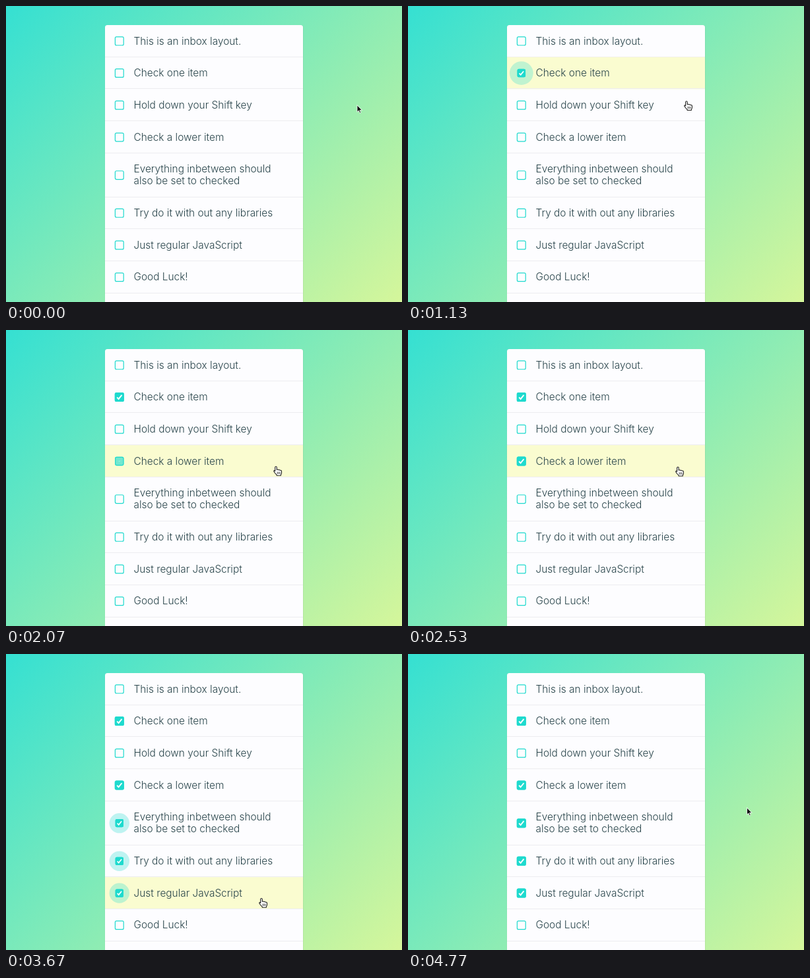
An HTML page for the animation above (4810 ms loop, 600 px wide and 450 px high).

```html
<!DOCTYPE html>
<html lang="en">
<head>
<meta charset="utf-8">
<title>Inbox checklist</title>
<style>
  html, body { margin: 0; width: 100%; height: 100%; overflow: hidden; }
  body { background: linear-gradient(135deg, #35e0d2, #d5f69b); }
  svg { display: block; }
  text { font: 300 15.4px Inter, "Open Sans", sans-serif; fill: #28444a; }
</style>
</head>
<body>
<svg width="600" height="450" viewBox="0 0 600 450">
  <rect x="149.5" y="29" width="301.5" height="440" rx="4" fill="#000" opacity=".05"/>
  <rect x="150" y="29" width="300" height="440" rx="3.5" fill="#fdfdff"/>
  <g id="list"></g>
  <g id="cursor" stroke-linejoin="round" stroke-linecap="round">
    <path id="arrow" d="M0 0V10.2L2.4 8 4 11.8 5.7 11 4.1 7.4H7.2Z" fill="#111" stroke="#fff" stroke-width=".8"/>
    <g id="hand" fill="#fff" stroke="#222" stroke-width="1.1">
      <path d="M-1.3 6.5V.8Q-1.2-.5 0-.5T1.3.8V4.4Q2.6 3.4 3.8 4.7 5.2 4 6.2 5.3 8.4 4.8 8.5 7V9.2Q8.3 10.8 7.4 12V13.2H1.2V12.2Q-1 10.2-2.3 8.2-3.8 6.4-2.9 5.8T-1.3 6.5Z"/>
      <path d="M2.2 8V10.6M4.1 8V10.6M6 8V10.6" stroke-width=".8"/>
    </g>
  </g>
</svg>
<script>
const LOOP = 4810, HOVER_LAG = 110, TEAL = '#1edace';
// each item: lines of text, then the time it gets checked
const items = [
  [['This is an inbox layout.']],
  [['Check one item'], 890],
  [['Hold down your Shift key']],
  [['Check a lower item'], 2050],
  [['Everything inbetween should', 'also be set to checked'], 3470],
  [['Try do it with out any libraries'], 3470],
  [['Just regular JavaScript'], 3470],
  [['Good Luck!']],
];
// cursor moves: start, end, target x and y, bend of the path
const home = [532, 151];
const moves = [
  [40, 470, 430, 106, 1],
  [1000, 1310, 409, 208, 1],
  [2520, 2800, 387, 372, 1],
  [3850, 4160, 518, 241, 3.3],
  [4300, 4680, 513.5, 234, 1],
];

const $ = id => document.getElementById(id);
const clamp = v => Math.min(1, Math.max(0, v));
const ease = v => v * v * (3 - 2 * v);

function add(parent, tag, attrs, content = '') {
  const node = document.createElementNS('http://www.w3.org/2000/svg', tag);
  for (const key in attrs) node.setAttribute(key, attrs[key]);
  node.textContent = content;
  return parent.appendChild(node);
}

function makeRow([lines, checkedAt = Infinity], y) {
  const list = $('list'), height = 30.7 + 18 * lines.length, mid = y + height / 2;
  const hover = add(list, 'rect', { x: 150, y, width: 300, height, fill: '#fafcd0' });
  add(list, 'rect', { x: 150, y: Math.round(y + height) - 1, width: 300, height: 1, fill: '#ededf0' });
  lines.forEach((line, i) =>
    add(list, 'text', { x: 193.5, y: mid + 5.2 + 18 * (i - (lines.length - 1) / 2) }, line));
  const box = add(list, 'g', {});
  const ripple = add(box, 'circle', { fill: TEAL });
  add(box, 'rect', { x: -6.4, y: -6.4, width: 12.8, height: 12.8, rx: 2, fill: 'none', stroke: TEAL, 'stroke-width': 1.2 });
  const fill = add(box, 'rect', { x: -7, y: -7, width: 14, height: 14, rx: 2.5, fill: TEAL });
  const tick = add(box, 'path', { d: 'M-3.6.3L-1.2 2.9 3.7-3.2', fill: 'none', stroke: '#fff', 'stroke-width': 1.9 });
  return { y, height, mid, checkedAt, hover, box, ripple, fill, tick };
}

const rows = [];
let nextY = 29;
for (const item of items) {
  const row = makeRow(item, nextY);
  rows.push(row);
  nextY += row.height;
}

function cursorAt(t) {
  let [x, y] = home;
  for (const [start, end, toX, toY, bend] of moves) {
    const p = ease(clamp((t - start) / (end - start)));
    x += (toX - x) * p;
    y += (toY - y) * p ** bend;
  }
  return [x, y];
}

function draw() {
  const t = performance.now() % LOOP;
  const [x, y] = cursorAt(t), [hoverX, hoverY] = cursorAt(t - HOVER_LAG);
  $('cursor').setAttribute('transform', `translate(${x} ${y})`);
  const overCard = x < 450;
  $('hand').style.display = overCard ? '' : 'none';
  $('arrow').style.display = overCard ? 'none' : '';

  for (const row of rows) {
    const age = t - row.checkedAt;
    const inside = hoverX < 450 && hoverY >= row.y && hoverY < row.y + row.height;
    row.hover.style.opacity = inside ? 1 : 0;

    const spread = clamp((age - 80) / 170);
    const scale = 1 - .12 * clamp(age / 60) * (1 - clamp((age - 220) / 180));
    row.box.setAttribute('transform', `translate(171.8 ${row.mid}) scale(${scale})`);
    row.fill.style.opacity = age < 0 ? 0 : clamp((age + 40) / 100);
    row.tick.setAttribute('transform', `scale(${clamp(age / 90)})`);
    row.ripple.setAttribute('r', (7 + 11.5 * spread) / scale);
    row.ripple.style.opacity = age < 80 ? 0 : .28 * (1 - clamp((age - 230) / 170));
  }
  requestAnimationFrame(draw);
}
draw();
</script>
</body>
</html>
```
